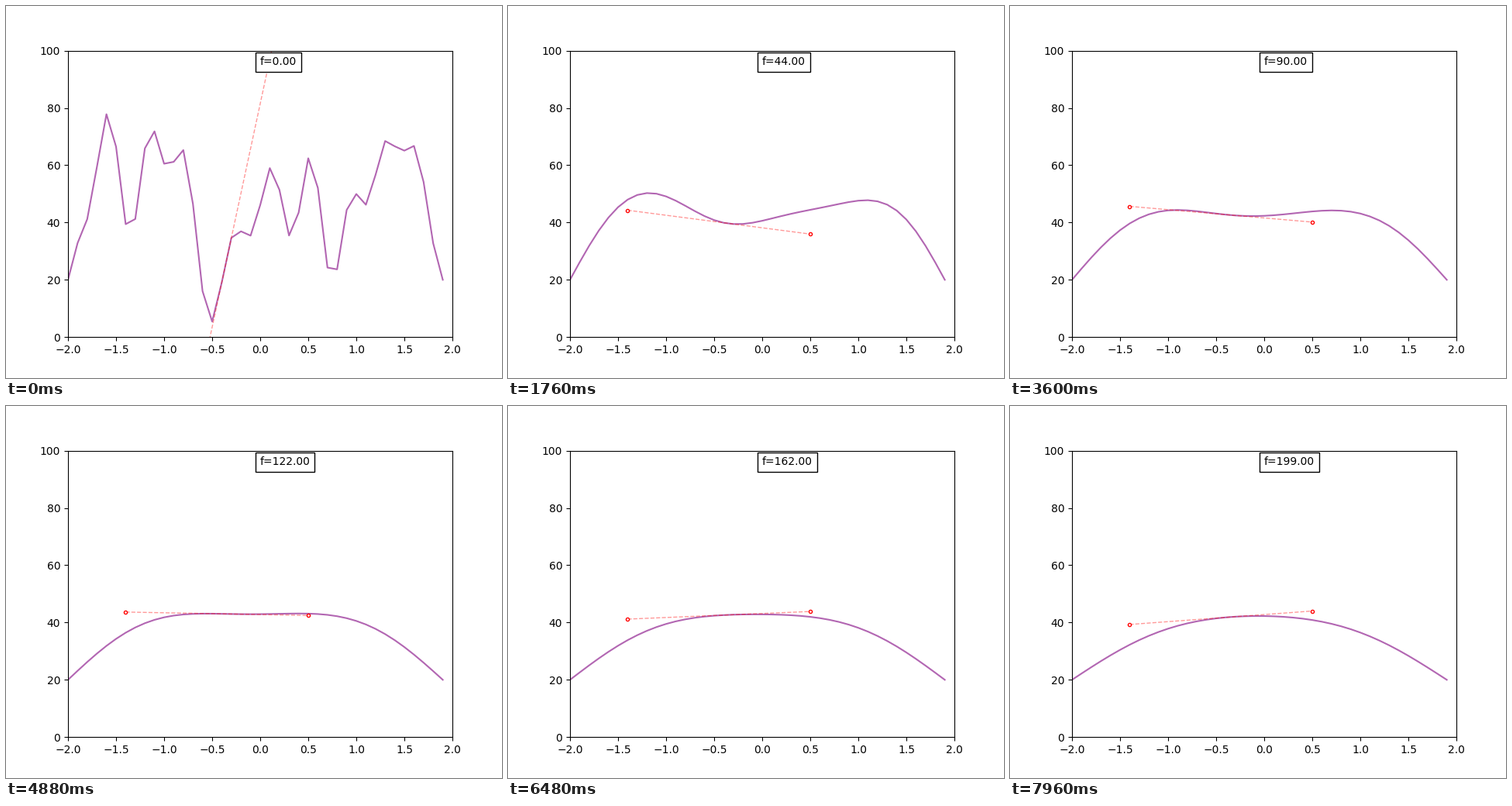
Animation, 640 px wide and 480 px high, one loop 8 s. Source, as a matplotlib script:

```python
import numpy as np
import matplotlib.pyplot as plt
from matplotlib.animation import FuncAnimation

FRAMES = 200
INTERVAL = 40
CELLS = 39             # grid cells along the rod
EDGE = 20              # fixed value at both ends
TOUCH = 16             # index where the tangent meets the curve
ENDS = np.array([-10, 9])

# Strengths of the sine modes that make up the starting profile.
MODES = np.array([32.45, 0.34, 22.64, 3.0, 11.89, -10.82, 2.64, 5.19,
                  6.71, 4.53, -1.47, -4.83, -0.75, -1.57, -3.23, 0.06,
                  -5.12, -5.59, 4.81, 4.54, -0.74, 4.12])

grid = np.arange(CELLS + 1)
x = -2 + 0.1 * grid
phase = np.pi * np.arange(1, len(MODES) + 1) / CELLS
waves = np.sin(np.outer(grid, phase))
decay = np.cos(phase / 2) ** 2


def profile(step):
    """Heat flow with fixed ends: each sine mode fades at its own rate."""
    return EDGE + waves @ (MODES * decay ** step)


fig, ax = plt.subplots(figsize=(6.4, 4.8), dpi=100)
ax.set_xlim(-2, 2)
ax.set_ylim(0, 100)

curve, = ax.plot([], [], color='purple', alpha=0.6, lw=1.5)
tangent, = ax.plot([], [], 'r--', alpha=0.4, lw=1)
tips, = ax.plot([], [], 'ro', ms=3, mfc='white')
label = ax.text(0, 95, '', bbox=dict(facecolor='white', edgecolor='black'))


def update(i):
    y = profile(i)
    slope = y[TOUCH + 1] - y[TOUCH]
    ends = x[TOUCH + ENDS], y[TOUCH] + slope * ENDS
    curve.set_data(x, y)
    tangent.set_data(*ends)
    tips.set_data(*ends)
    label.set_text(f'f={i:.2f}')
    return curve, tangent, tips, label


anim = FuncAnimation(fig, update, frames=FRAMES, interval=INTERVAL,
                     repeat=True, repeat_delay=0)
plt.show()
```
